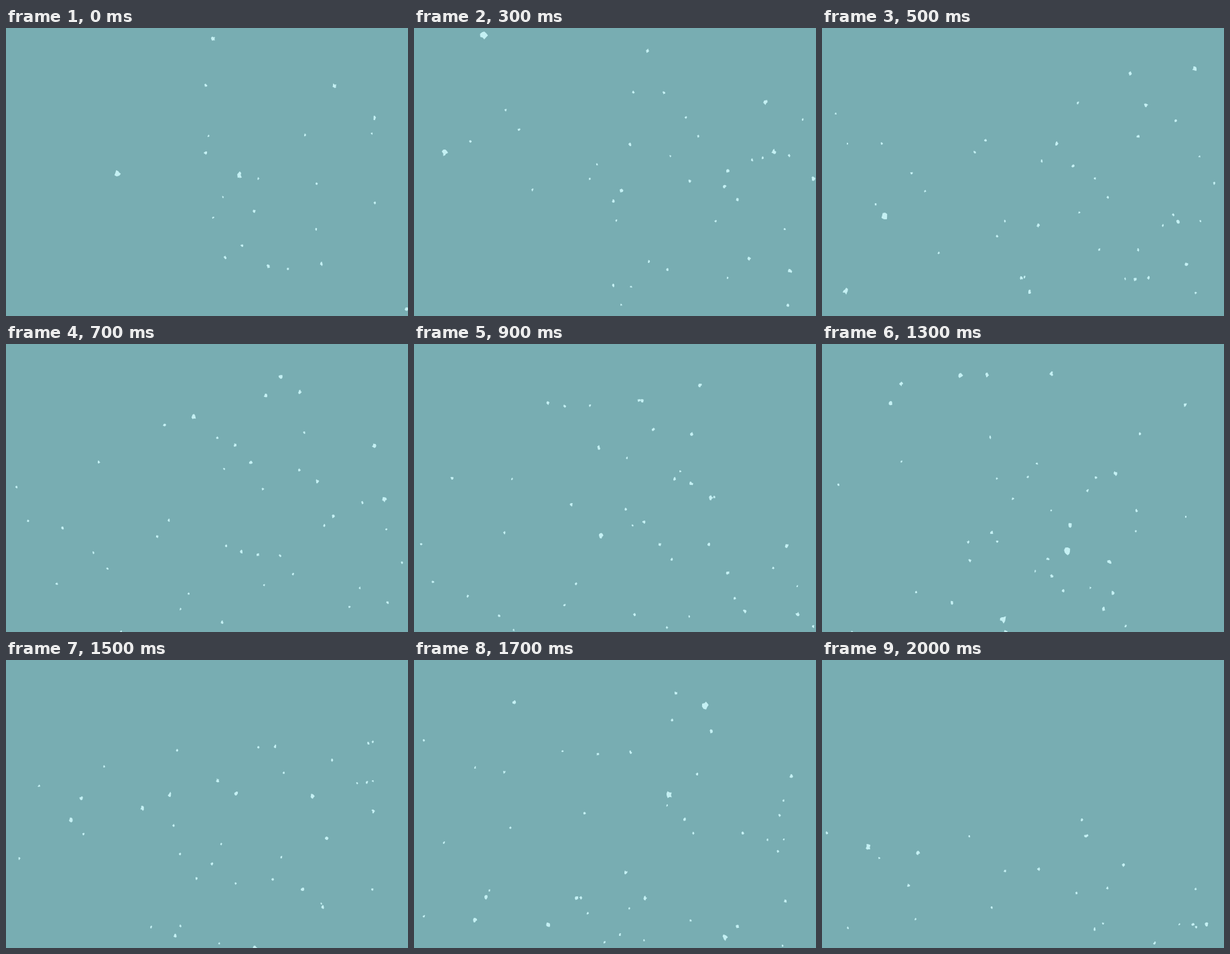
An HTML page with a canvas that plays this animation: 600x429 px, repeating every 2100 ms.

```html
<!DOCTYPE html>
<html lang="en">
<head>
<meta charset="utf-8">
<title>Snowfall</title>
<style>
html, body { margin: 0; width: 100%; height: 100%; overflow: hidden; background: #78adb2; }
canvas { display: block; }
</style>
</head>
<body>
<canvas id="sky" width="600" height="429"></canvas>
<script>
const W = 600, H = 429, LOOP = 2100, STEP = 100;
const ctx = document.getElementById('sky').getContext('2d');
const flakes = [];

function random(seed) {
  return () => {
    seed = (seed * 1664525 + 1013904223) >>> 0;
    return seed / 4294967296;
  };
}
const rnd = random(20417);

// A flake passes (x, y) at time `at`, falling `speed` pixels per step.
function add(at, x, y, speed, born = -LOOP) {
  flakes.push({ at, x, y, speed, born, seed: Math.floor(rnd() * 1e6) });
}

// Slow flakes are far away: they are small and start lower in the view.
function emit(from, to, count, left, right) {
  for (let i = 0; i < count; i++) {
    const born = from + (to - from) * (i + rnd()) / count;
    const speed = 42 + 48 * rnd() ** 2;
    const top = Math.max(8, 240 - 3.2 * speed) + 40 * rnd();
    add(born, left + (right - left) * rnd(), top, speed, born);
  }
}

emit(-550, 0, 22, 280, 595);
emit(0, 300, 24, 30, 590);
emit(300, 1700, 88, 12, 590);

// Large flakes close to the viewer.
add(0, 167, 217, 125);
add(0, 348, 219, 110);
add(300, 104, 11, 135);
add(300, 46, 186, 103);
add(1300, 366, 309, 120);
add(1300, 270, 410, 125);
add(1700, 435, 67, 125);
add(1700, 381, 201, 130);
add(1700, 464, 413, 105);
add(2000, 69, 279, 110);

// A small ragged blob whose outline shifts as it tumbles.
function drawFlake(x, y, r, seed) {
  const jitter = random(seed);
  const points = 9;
  jitter();
  ctx.beginPath();
  for (let i = 0; i < points; i++) {
    const a = i / points * Math.PI * 2;
    const d = r * (0.5 + 0.7 * jitter());
    ctx.lineTo(x + Math.cos(a) * d * 0.95, y + Math.sin(a) * d * 1.1);
  }
  ctx.fill();
}

function draw(t) {
  ctx.fillStyle = '#78adb2';
  ctx.fillRect(0, 0, W, H);
  ctx.fillStyle = '#c4f0f3';
  for (const f of flakes) {
    const fall = f.speed * (t - f.at) / STEP;
    const y = f.y + fall;
    if (t < f.born || y < 8 || y > H + 8) continue;
    // Perspective spreads the paths away from the middle.
    const x = f.x + (f.x - 305) * 0.0002 * fall;
    drawFlake(x, y, f.speed * 0.042, f.seed + t * 31);
  }
}

function tick() {
  draw(Math.floor(performance.now() % LOOP / STEP) * STEP);
  requestAnimationFrame(tick);
}
tick();
</script>
</body>
</html>
```
